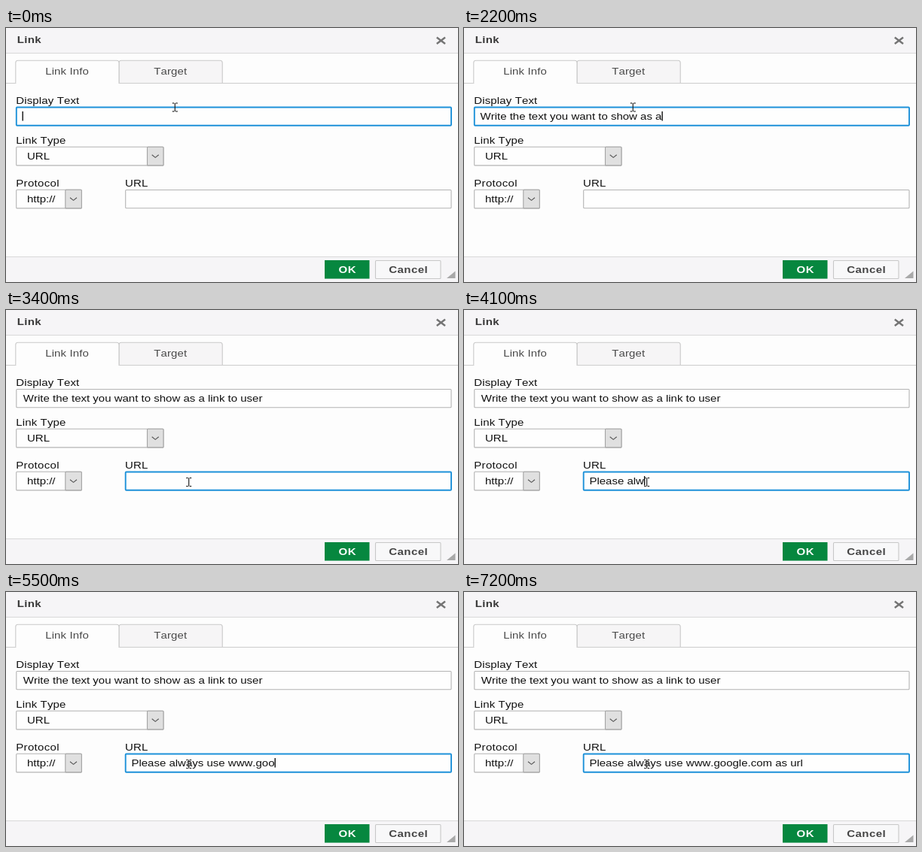
Recreate the animation shown at these times as an HTML page with a canvas. Size 600x338 px, loop 7300 ms.

```html
<!DOCTYPE html>
<html lang="en">
<head>
<meta charset="utf-8">
<title>Link dialog</title>
<style>
  html, body { margin: 0; width: 100%; height: 100%; overflow: hidden; background: #fdfdfd; }
  canvas { display: block; }
</style>
</head>
<body>
<canvas id="stage" width="600" height="338"></canvas>
<script>
const ctx = document.getElementById('stage').getContext('2d');
const LOOP = 7300, STEP = 100;
const STRETCH = 1.25; // the whole dialog is shown in a wide pixel aspect
const FONT = '12px "Liberation Sans", Arial, sans-serif';

const DISPLAY_TEXT = 'Write the text you want to show as a link to user';
const URL_TEXT = 'Please always use www.google.com as url';

// [time in ms, characters typed]
const displayTyping = [[0, 0], [800, 15], [1300, 23], [1400, 23], [2200, 36], [3000, 48], [3100, 49]];
const urlTyping = [[3400, 0], [3800, 6], [4600, 17], [4900, 18], [5400, 23], [6000, 32], [6300, 33], [7100, 39]];
const MOVE_START = 3100, MOVE_END = 3300;

function valueAt(keys, t) {
  if (t <= keys[0][0]) return keys[0][1];
  for (let i = 1; i < keys.length; i++) {
    const [t0, v0] = keys[i - 1], [t1, v1] = keys[i];
    if (t <= t1) return v0 + (v1 - v0) * (t - t0) / (t1 - t0);
  }
  return keys[keys.length - 1][1];
}

function text(str, x, y, { color = '#111', bold = false, spacing = 0, align = 'left' } = {}) {
  ctx.save();
  ctx.translate(x, y);
  ctx.scale(STRETCH, 1);
  ctx.font = (bold ? 'bold ' : '') + FONT;
  ctx.fontKerning = 'none';
  ctx.letterSpacing = spacing + 'px';
  ctx.textAlign = align;
  ctx.fillStyle = color;
  ctx.fillText(str, 0, 0);
  const width = ctx.measureText(str).width * STRETCH;
  ctx.restore();
  return width;
}

function fill(x, y, w, h, color) {
  ctx.fillStyle = color;
  ctx.fillRect(x, y, w, h);
}

function box(x, y, w, h, { fill = '#fefefe', stroke = '#b4b4b4', width = 1.1, radius = 1 } = {}) {
  ctx.beginPath();
  ctx.roundRect(x, y, w, h, radius);
  ctx.fillStyle = fill;
  ctx.fill();
  ctx.strokeStyle = stroke;
  ctx.lineWidth = width;
  ctx.stroke();
}

function path(points, color, width) {
  ctx.beginPath();
  points.forEach(([x, y]) => ctx.lineTo(x, y));
  ctx.strokeStyle = color;
  ctx.lineWidth = width;
  ctx.stroke();
}

function tab(x, label, fillColor) {
  box(x, 43.3, 137.2, 30.2, { fill: fillColor, stroke: '#c9c9c9', radius: [3, 3, 0, 0] });
  text(label, x + 68.3, 62.3, { color: '#4a4a4a', spacing: 0.1, align: 'center' });
}

function select(x, y, w, label) {
  box(x, y, w, 24.6);
  box(x + w - 21.5, y, 21.5, 24.6, { fill: '#e0e0e0', stroke: '#a4a4a4' });
  const cx = x + w - 10.8, cy = y + 12.3;
  path([[cx - 4.5, cy - 1.8], [cx, cy + 1.8], [cx + 4.5, cy - 1.8]], '#555', 1.1);
  text(label, 28, y + 16.3);
}

function input(x, y, w, value, focused, caret) {
  box(x, y, w, 24.3, focused ? { stroke: '#1d91d9', width: 1.9 } : {});
  const left = x + (focused ? 7.7 : 9);
  const width = text(value, left, y + 16.2);
  if (caret) fill(left + width, y + 5.5, 1.4, 12.5, '#111');
}

function iBeam(x, y) {
  path([[x, y - 5.5], [x, y + 5.5]], '#222', 1.2);
  for (const end of [-5.5, 5.5]) {
    path([[x - 3.5, y + end], [x - 1, y + end]], '#222', 1.2);
    path([[x + 1, y + end], [x + 3.5, y + end]], '#222', 1.2);
  }
}

function drawChrome() {
  fill(0, 0, 600, 338, '#fdfdfd');
  fill(0, 0, 600, 33, '#f6f5f7');
  fill(0, 33, 600, 1, '#d9d9d9');
  text('Link', 14.7, 20.3, { color: '#383838', bold: true, spacing: 0.3 });
  path([[571.8, 12.5], [583, 21]], '#747474', 2.4);
  path([[583, 12.5], [571.8, 21]], '#747474', 2.4);

  tab(150, 'Target', '#f6f5f6');
  tab(12.8, 'Link Info', '#fdfdfd');
  fill(0, 73, 600, 1, '#cdcdcd');
  fill(13.4, 72.6, 136, 1.8, '#fdfdfd');

  const label = { spacing: 0.1 };
  text('Display Text', 13.3, 100.8, label);
  text('Link Type', 13.3, 153.8, label);
  text('Protocol', 13.3, 210.8, { spacing: 0.25 });
  text('URL', 158, 210.8, label);
  select(13.7, 158.3, 195.3, 'URL');
  select(13.7, 215.3, 86.6, 'http://');

  fill(0, 304, 600, 34, '#f6f5f7');
  fill(0, 304, 600, 1, '#d9d9d9');
  const button = { bold: true, spacing: 0.35, align: 'center' };
  fill(423, 309, 59.5, 24.6, '#06873f');
  text('OK', 453.3, 325.8, { ...button, color: '#fff' });
  box(490.5, 309.5, 86.5, 24, { fill: '#f8f8f9', stroke: '#c8c8c8' });
  text('Cancel', 534.2, 325.8, { ...button, color: '#444' });

  ctx.beginPath();
  ctx.moveTo(596.5, 323.5);
  ctx.lineTo(596.5, 333);
  ctx.lineTo(585, 333);
  ctx.fillStyle = '#a9a9a9';
  ctx.fill();
}

function draw(t) {
  const onUrl = t >= MOVE_END;
  const typed = (str, keys) => str.slice(0, Math.round(valueAt(keys, t)));
  drawChrome();
  input(13.8, 105.5, 577.2, typed(DISPLAY_TEXT, displayTyping), !onUrl, !onUrl);
  input(158.7, 215.5, 432.3, typed(URL_TEXT, urlTyping), onUrl, t > 3400 && t < 7200);
  iBeam(valueAt([[MOVE_START, 224.3], [MOVE_END, 242.7]], t),
        valueAt([[MOVE_START, 105.5], [MOVE_END, 229]], t));
}

function tick() {
  const t = performance.now() % LOOP;
  draw(Math.floor(t / STEP) * STEP);
  requestAnimationFrame(tick);
}
tick();
</script>
</body>
</html>
```
